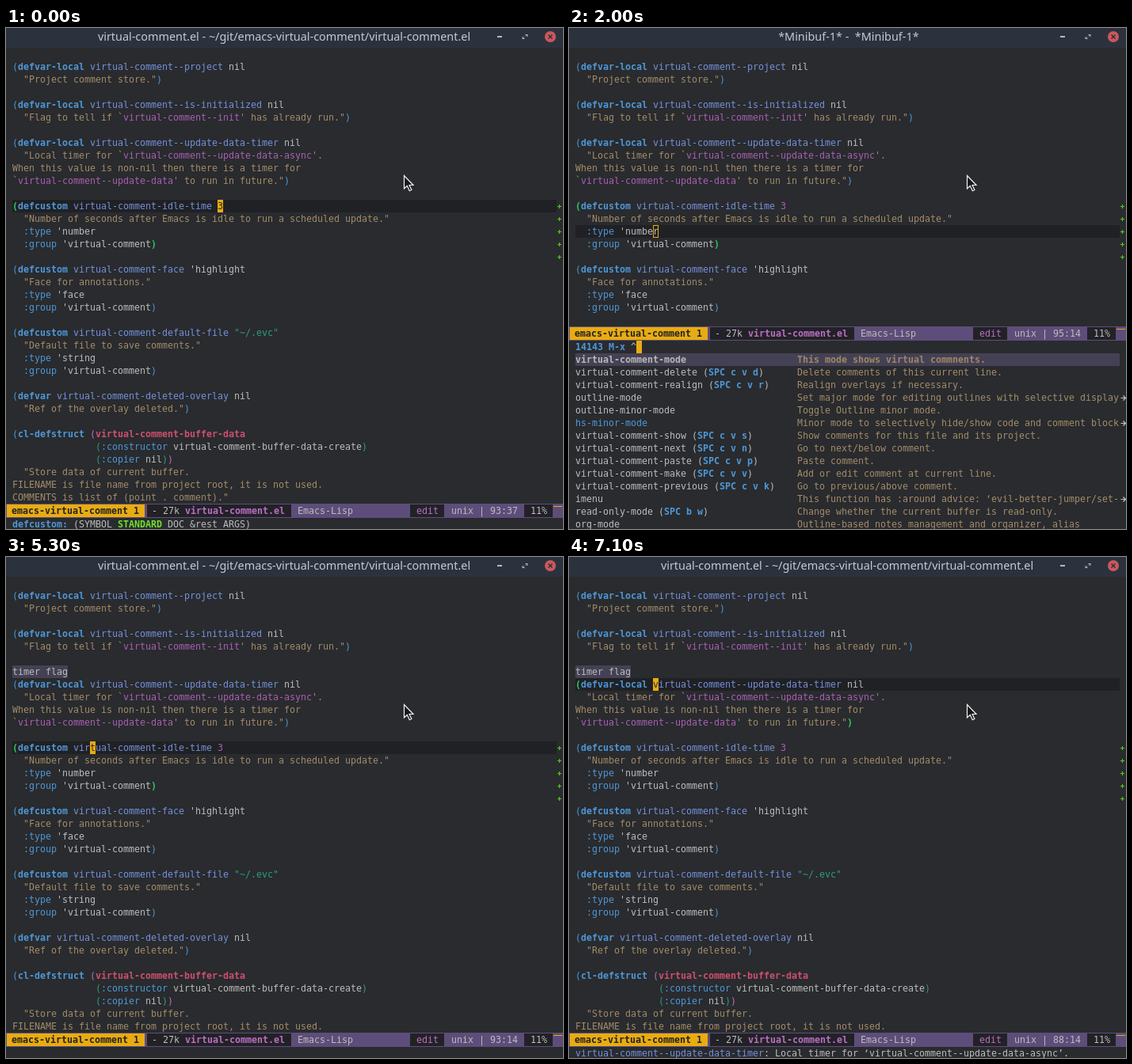
Recreate the animation shown at these times as an HTML page with a canvas. Size 703 px wide and 633 px high, loop 8000 ms.

```html
<!DOCTYPE html>
<html lang="en">
<head>
<meta charset="utf-8">
<title>virtual-comment</title>
<style>
  html, body { margin: 0; width: 100%; height: 100%; overflow: hidden; background: #292b2e; }
  canvas { display: block; }
</style>
</head>
<body>
<canvas id="stage" width="703" height="633"></canvas>
<script>
const LOOP = 8000, COL = 7, ROW = 16, LEFT = 8, TOP = 25, FIRST_LINE = 81;
const BG = '#292b2e', HL = '#202124', GOLD = '#e9ac10', PURPLE = '#5d4d7a', DARK = '#222226', SELECT = '#444155';
const MONO = '11.63px "DejaVu Sans Mono", "Noto Sans Mono", monospace';

// Style codes; text uses "¦x" to switch to style x.
const COLORS = {
  b: '#bcbcbc', k: '#4f97d7', v: '#7590db', d: '#a38b69', c: '#a95fb2', s: '#2f9d78',
  p: '#bc6ec5', K: '#4f97d7', B: '#b8b8b8', D: '#9f8766', P: '#bc6ec5', T: '#ce4f70',
  M: '#70e030', G: '#2ec85a', N: '#222226'
};

const doc = s => '¦d' + s.replace(/`([^']+)'/g, "`¦c$1¦d'");
const head = (kw, name, val) => `¦k(¦K${kw}¦v ${name} ¦${val}`;
const defvar = (kw, name, ...docs) => {
  const body = docs.map(doc);
  body[body.length - 1] += '¦k)';
  return [head(kw, name, 'bnil'), ...body, ''];
};
const defcustom = (name, val, text, type) => [
  head('defcustom', 'virtual-comment-' + name, val), doc(`  "${text}"`),
  `  ¦k:type ¦b'${type}`, "  ¦k:group ¦b'virtual-comment¦k)", ''
];

const lines = [
  '',
  ...defvar('defvar-local', 'virtual-comment--project', '  "Project comment store."'),
  ...defvar('defvar-local', 'virtual-comment--is-initialized',
    '  "Flag to tell if `virtual-comment--init\' has already run."'),
  ...defvar('defvar-local', 'virtual-comment--update-data-timer',
    '  "Local timer for `virtual-comment--update-data-async\'.',
    'When this value is non-nil then there is a timer for',
    '`virtual-comment--update-data\' to run in future."'),
  ...defcustom('idle-time', 'c3', 'Number of seconds after Emacs is idle to run a scheduled update.', 'number'),
  ...defcustom('face', "b'highlight", 'Face for annotations.', 'face'),
  ...defcustom('default-file', 's"~/.evc"', 'Default file to save comments.', 'string'),
  ...defvar('defvar', 'virtual-comment-deleted-overlay', '  "Ref of the overlay deleted."'),
  '¦k(¦Kcl-defstruct ¦p(¦Tvirtual-comment-buffer-data',
  ' '.repeat(15) + '¦s(¦k:constructor ¦bvirtual-comment-buffer-data-create¦s)',
  ' '.repeat(15) + '¦s(¦k:copier ¦bnil¦s)¦p)',
  doc('  "Store data of current buffer.'),
  doc('FILENAME is file name from project root, it is not used.'),
  doc('COMMENTS is list of (point . comment)."')
];
const plain = lines.map(s => s.replace(/¦./g, ''));

// Command, key binding, description, and whether the row runs off the edge.
const commands = [
  ['virtual-comment-mode', '', 'This mode shows virtual commnents.'],
  ['virtual-comment-delete', 'c v d', 'Delete comments of this current line.'],
  ['virtual-comment-realign', 'c v r', 'Realign overlays if necessary.'],
  ['outline-mode', '', 'Set major mode for editing outlines with selective display', 1],
  ['outline-minor-mode', '', 'Toggle Outline minor mode.'],
  ['¦khs-minor-mode', '', 'Minor mode to selectively hide/show code and comment block', 1],
  ['virtual-comment-show', 'c v s', 'Show comments for this file and its project.'],
  ['virtual-comment-next', 'c v n', 'Go to next/below comment.'],
  ['virtual-comment-paste', 'c v p', 'Paste comment.'],
  ['virtual-comment-make', 'c v v', 'Add or edit comment at current line.'],
  ['virtual-comment-previous', 'c v k', 'Go to previous/above comment.'],
  ['imenu', '', 'This function has :around advice: ‘evil-better-jumper/set-', 1],
  ['read-only-mode', 'b w', 'Change whether the current buffer is read-only.'],
  ['org-mode', '', 'Outline-based notes management and organizer, alias']
];

const FILE_TITLE = 'virtual-comment.el - ~/git/emacs-virtual-comment/virtual-comment.el';
const eldoc = arg => '¦Kdefcustom: ¦b' + '(SYMBOL STANDARD DOC &rest ARGS)'.replace(arg, `¦M${arg}¦b`);
const idlePair = [[93, 0], [96, 25]], timerPair = [[88, 0], [91, 49]];

// Each step changes only the listed properties.
const steps = [
  [0, { line: 93, col: 37, pair: idlePair, msg: eldoc('STANDARD'), title: FILE_TITLE, flag: false, list: false }],
  [700, { line: 94 }],
  [900, { line: 95, col: 14 }],
  [1300, { msg: eldoc('ARGS') }],
  [1600, { msg: '' }],
  [1900, { list: true }],
  [2000, { title: ' *Minibuf-1* -  *Minibuf-1*' }],
  [3600, { list: false, title: FILE_TITLE, flag: true, msg: 'Virtual-Comment mode enabled in current buffer' }],
  [4400, { line: 94, msg: '' }],
  [5300, { line: 93 }],
  [5400, { line: 92, col: 0 }],
  [5500, { line: 91, col: 14 }],
  [5700, { pair: timerPair }],
  [5900, { line: 89 }],
  [6000, { line: 88 }],
  [6400, { line: 87, col: 0 }],
  [6600, { line: 88, col: 14, pair: [] }],
  [6800, { pair: timerPair }],
  [7100, { msg: '¦vvirtual-comment--update-data-timer¦b: Local timer for ‘virtual-comment--update-data-async’.' }]
];

const ctx = document.getElementById('stage').getContext('2d');

function rect(x, y, w, h, color) {
  ctx.fillStyle = color;
  ctx.fillRect(x, y, w, h);
}

function stroke(path, color, width) {
  ctx.strokeStyle = color;
  ctx.lineWidth = width;
  ctx.stroke(new Path2D(path));
}

function text(markup, x, top) {
  const parts = ('¦b' + markup).split('¦').slice(1);
  for (const part of parts) {
    const run = part.slice(1);
    ctx.font = (/[A-Z]/.test(part[0]) ? 'bold ' : '') + MONO;
    ctx.fillStyle = COLORS[part[0]];
    ctx.fillText(run, x, top + 12);
    x += run.length * COL;
  }
}

function drawTitle(title) {
  rect(0, 0, 703, TOP, '#2c323d');
  ctx.font = '14.4px "Noto Sans", "Open Sans", sans-serif';
  ctx.fillStyle = '#c3cad5';
  ctx.textAlign = 'center';
  ctx.fillText(title, 351, 16);
  ctx.textAlign = 'left';
  rect(620, 10, 6, 2, '#b4bac5');
  stroke('M655.5 8.5h2.5v2.5M654.5 13.5h-2.5v-2.5M658 8.5l-2 2M652 13.5l2-2', '#b4bac5', 1);
  ctx.fillStyle = '#cc575d';
  ctx.beginPath();
  ctx.arc(687, 11, 7, 0, Math.PI * 2);
  ctx.fill();
  stroke('M684.5 8.5l5 5m0-5l-5 5', '#2c323d', 1.5);
}

function drawBuffer(state, bottom) {
  const rowTop = line => TOP + (line - FIRST_LINE) * ROW + (state.flag && line >= 88 ? ROW : 0);
  const cellX = col => LEFT + col * COL;

  ctx.save();
  ctx.beginPath();
  ctx.rect(0, TOP, 703, bottom - TOP);
  ctx.clip();
  rect(LEFT, rowTop(state.line), 687, ROW, HL);
  if (state.flag) {
    const y = rowTop(88) - ROW;
    rect(LEFT, y, 70, ROW, SELECT);
    text('timer flag', LEFT, y);
  }
  lines.forEach((line, i) => text(line, LEFT, rowTop(FIRST_LINE + i)));
  for (let line = 93; line < 98; line++) {
    const y = rowTop(line) + 8.5;
    stroke(`M696 ${y}h5M698.5 ${y - 2.5}v5`, '#55c81e', 1.2);
  }
  for (const [line, col] of state.pair) {
    rect(cellX(col), rowTop(line), COL, ROW, line === state.line ? HL : BG);
    text('¦G' + plain[line - FIRST_LINE][col], cellX(col), rowTop(line));
  }
  const x = cellX(state.col), y = rowTop(state.line);
  if (state.list) {
    ctx.strokeStyle = GOLD;
    ctx.lineWidth = 1;
    ctx.strokeRect(x + .5, y + .5, COL - 1, ROW - 1);
  } else {
    rect(x, y, COL, ROW, GOLD);
    ctx.font = MONO;
    ctx.fillStyle = BG;
    ctx.fillText(plain[state.line - FIRST_LINE][state.col] || '', x, y + 12);
  }
  ctx.restore();
}

function drawModeline(state, y) {
  rect(0, y, 703, 18, PURPLE);
  rect(1, y + 1, 174, 16, GOLD);
  for (const [x, w] of [[178, 182], [510, 43], [654, 36]]) rect(x, y + 1, w, 16, DARK);
  rect(691, y + 3, 11, 1, GOLD);
  const position = state.line + ':' + String(state.col).padStart(2);
  const labels = [
    [7, '¦Nemacs-virtual-comment 1'], [184, '- 27k ¦Pvirtual-comment.el'], [368, 'Emacs-Lisp'],
    [518, '¦pedit'], [562, 'unix | ' + position], [662, '11%']
  ];
  for (const [x, label] of labels) text(label, x, y + 1);
}

function drawList(top) {
  text('¦K14143 M-x ¦b^', LEFT, top);
  rect(85, top, COL, ROW, GOLD);
  commands.forEach(([name, keys, about, cut], i) => {
    const y = top + (i + 1) * ROW;
    if (i === 0) rect(LEFT, y, 687, ROW, SELECT);
    text((i ? '' : '¦B') + name + (keys && ` (¦KSPC ${keys}¦b)`), LEFT, y);
    text((i ? '¦d' : '¦D') + about, 288, y);
    if (cut) stroke(`M696.5 ${y + 8.5}h6M699.5 ${y + 5.5}l3 3l-3 3`, '#c8c8c8', 1.2);
  });
}

function drawPointer() {
  const arrow = 'M502.5 186.5v16.5l3.8-3.5l3 6.2l2.6-1.2l-2.9-6h5z';
  ctx.fillStyle = '#16181a';
  ctx.fill(new Path2D(arrow));
  stroke(arrow, '#f4f4f4', 1.2);
}

function draw(time) {
  const state = Object.assign({}, ...steps.filter(([at]) => at <= time).map(step => step[1]));
  const modeTop = TOP + (state.list ? 22 : 36) * ROW;
  rect(0, 0, 703, 633, BG);
  drawTitle(state.title);
  drawBuffer(state, modeTop);
  drawModeline(state, modeTop);
  if (state.list) drawList(modeTop + 18);
  else text(state.msg, LEFT, modeTop + 18);
  drawPointer();
}

const start = performance.now();
function tick() {
  draw((performance.now() - start) % LOOP);
  requestAnimationFrame(tick);
}
tick();
</script>
</body>
</html>
```
